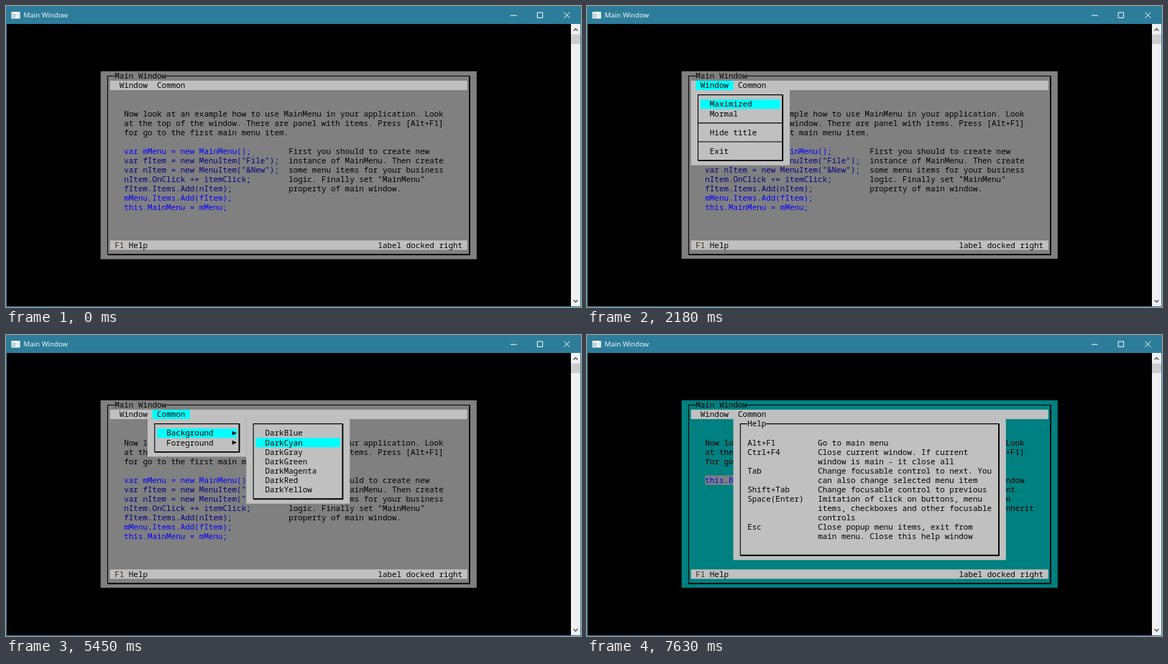
Recreate the animation shown at these times as an HTML page. Size 800x419 px, loop 8 s.

```html
<!DOCTYPE html>
<html lang="en">
<head>
<meta charset="utf-8">
<title>Main Window</title>
<style>
  html, body { margin: 0; width: 100%; height: 100%; overflow: hidden; background: #000; }
  svg { display: block; width: 100%; height: 100%; }
  text { white-space: pre; }
  #console text { font: 10.9px "Noto Sans Mono", "DejaVu Sans Mono", monospace; }
  #caption { font: 9.7px "Open Sans", "Noto Sans", sans-serif; fill: #fff; }
</style>
</head>
<body>
<svg viewBox="0 0 800 419">
  <rect width="800" height="419" fill="#2d7d9a"/>
  <rect x="1" y="25" width="785" height="393" fill="#000"/>
  <rect x="7.5" y="8" width="12" height="9.5" fill="#f4f8fa"/>
  <path d="M9 11h4v5h-4zM15 11.5h3M15 13.5h3" fill="#c3d3da" stroke="#a9bcc5" stroke-width=".6"/>
  <text id="caption" x="24.6" y="16.4">Main Window</text>
  <path d="M702 13.2h8.5M739.2 9h7.4v7.4h-7.4zM776.4 8.8l7.8 7.8M784.2 8.8l-7.8 7.8" fill="none" stroke="#fff"/>
  <rect x="786" y="25" width="13" height="393" fill="#f0f0f0"/>
  <rect x="786" y="39.5" width="13" height="13.5" fill="#cdcdcd"/>
  <path d="M789.6 34.4l2.9-3l2.9 3M789.6 409.2l2.9 3l2.9-3" fill="none" stroke="#505050" stroke-width="1.4"/>
  <g id="console"></g>
</svg>
<script>
const CELL_W = 6.54, CELL_H = 13.08;
const X = col => +(0.8 + col * CELL_W).toFixed(2);
const Y = row => +(25.5 + row * CELL_H).toFixed(2);
const GRAY = '#808080', SILVER = '#c0c0c0', CYAN = '#00ffff', TEAL = '#008080';
const BLUE = '#0000ff', NAVY = '#000080';

const escapeText = s => s.replace(/&/g, '&amp;').replace(/</g, '&lt;');

const box = (c0, r0, c1, r1, fill) =>
  `<rect x="${X(c0)}" y="${Y(r0)}" width="${X(c1) - X(c0)}" height="${Y(r1) - Y(r0)}" fill="${fill}"/>`;

const write = (col, row, text, fill = '#000') =>
  `<text x="${X(col)}" y="${Y(row) + 10.3}" fill="${fill}">${escapeText(text)}</text>`;

const writeLines = (col, row, lines, fill) =>
  lines.map((line, i) => write(col, row + i, line, fill)).join('');

// Thin top and left edges, heavy right and bottom edges, through cell centres
function frame(c0, r0, c1, r1) {
  const [l, t, r, b] = [X(c0 + .5), Y(r0 + .5), X(c1 + .5), Y(r1 + .5)];
  return `<g fill="none" stroke="#000"><path d="M${l} ${b}V${t}H${r}" stroke-width="1.1"/>` +
    `<path d="M${r} ${t}V${b}H${l}" stroke-width="1.9"/></g>`;
}

const frameTitle = (col, row, text, fill) =>
  box(col, row, col + text.length, row + 1, fill) + write(col, row, text);

function popup(col, width, items, selected) {
  const last = 8 + items.length, right = col + width;
  let out = box(col, 7, right, last + 1, SILVER) + frame(col + 1, 7, right - 2, last);
  items.forEach((item, i) => {
    const row = 8 + i;
    if (item === '-') {
      out += `<path d="M${X(col + 1.5)} ${Y(row + .5)}H${X(right - 1.5)}" stroke="#000" stroke-width="1.1"/>`;
      return;
    }
    if (i === selected) out += box(col + 2, row, right - 2, row + 1, CYAN);
    const label = item.replace('>', '');
    out += write(col + 4, row, label);
    if (label !== item)
      out += `<path d="M${X(right - 3)} ${Y(row + .5) - 2.9}l6.3 2.9l-6.3 2.9z"/>`;
  });
  return out;
}

const intro = [
  'Now look at an example how to use MainMenu in your application. Look',
  'at the top of the window. There are panel with items. Press [Alt+F1]',
  'for go to the first main menu item.'
];
const code = [
  ['var mMenu = new MainMenu();', BLUE],
  ['var fItem = new MenuItem("File");', NAVY],
  ['var nItem = new MenuItem("&New");', NAVY],
  ['nItem.OnClick += itemClick;', NAVY],
  ['fItem.Items.Add(nItem);', NAVY],
  ['mMenu.Items.Add(fItem);', BLUE],
  ['this.MainMenu = mMenu;', BLUE]
];
const menuNotes = [
  'First you should to create new',
  'instance of MainMenu. Then create',
  'some menu items for your business',
  'logic. Finally set "MainMenu"',
  'property of main window.'
];
const backgroundNotes = [
  'The Background property of window',
  'sets background color of client',
  'area. All controls who set own',
  'background is [NotSet] will inherit',
  'parent background'
];
const helpKeys = [
  ['Alt+F1', 'Go to main menu'],
  ['Ctrl+F4', 'Close current window. If current'],
  ['', 'window is main - it close all'],
  ['Tab', 'Change focusable control to next. You'],
  ['', 'can also change selected menu item'],
  ['Shift+Tab', 'Change focusable control to previous'],
  ['Space(Enter)', 'Imitation of click on buttons, menu'],
  ['', 'items, checkboxes and other focusable'],
  ['', 'controls'],
  ['Esc', 'Close popup menu items, exit from'],
  ['', 'main menu. Close this help window']
];
const colors = ['DarkBlue', 'DarkCyan', 'DarkGray', 'DarkGreen', 'DarkMagenta', 'DarkRed', 'DarkYellow'];

function menuExample() {
  return code.map(([line, fill], i) => write(25, 13 + i, line, fill)).join('') +
    writeLines(60, 13, menuNotes);
}

function backgroundExample() {
  const line = 'this.Background = Color.{value};';
  return box(25, 13, 25 + line.length, 14, GRAY) + write(25, 13, line, BLUE) +
    writeLines(60, 13, backgroundNotes);
}

function mainWindow({ fill = GRAY, active, bottom = 24.95 }) {
  const bar = { Window: 23, Common: 31 };
  let out = box(20, 5, 100, bottom, fill) + frame(21, 5, 98, 24) +
    frameTitle(23, 5, 'Main Window', fill) + box(22, 6, 98, 7, SILVER);
  for (const [label, col] of Object.entries(bar)) {
    if (label === active) out += box(col, 6, col + 8, 7, CYAN);
    out += write(col + 1, 6, label);
  }
  return out + writeLines(25, 9, intro) +
    (fill === TEAL ? backgroundExample() : menuExample()) +
    box(22, 23, 98, 24, SILVER) + write(23, 23, 'F1', '#3c2c18') +
    write(26, 23, 'Help') + write(79, 23, 'label docked right');
}

function helpWindow() {
  return box(31, 7, 89, 22, SILVER) + frame(32, 7, 87, 21) + frameTitle(34, 7, 'Help', SILVER) +
    helpKeys.map(([key, text], i) => write(34, 9 + i, key) + write(49, 9 + i, text)).join('');
}

const windowMenu = () => popup(22, 21, ['Maximized', 'Mormal', '-', 'Hide title', '-', 'Exit'], 0);
const commonMenu = () => popup(30, 21, ['Background>', 'Foreground>'], 0);
const colorMenu = selected => popup(51, 22, colors, selected);

const LOOP = 8000, STEP = 1090;
const steps = [
  mainWindow({ bottom: 25 }),
  mainWindow({ bottom: 25, active: 'Window' }),
  mainWindow({ active: 'Window' }) + windowMenu(),
  mainWindow({ active: 'Common' }) + commonMenu(),
  mainWindow({ active: 'Common' }) + commonMenu() + colorMenu(0),
  mainWindow({ active: 'Common' }) + commonMenu() + colorMenu(1),
  mainWindow({ fill: TEAL }),
  mainWindow({ fill: TEAL }) + helpWindow()
];

const screen = document.getElementById('console');
screen.innerHTML = steps.map(s => `<g style="display:none">${s}</g>`).join('');
const layers = [...screen.children];
const start = performance.now();

function show(now) {
  const t = Math.max(0, now - start) % LOOP;
  const current = Math.floor(t / STEP);
  layers.forEach((layer, i) => { layer.style.display = i === current ? '' : 'none'; });
  requestAnimationFrame(show);
}
show(start);
</script>
</body>
</html>
```
